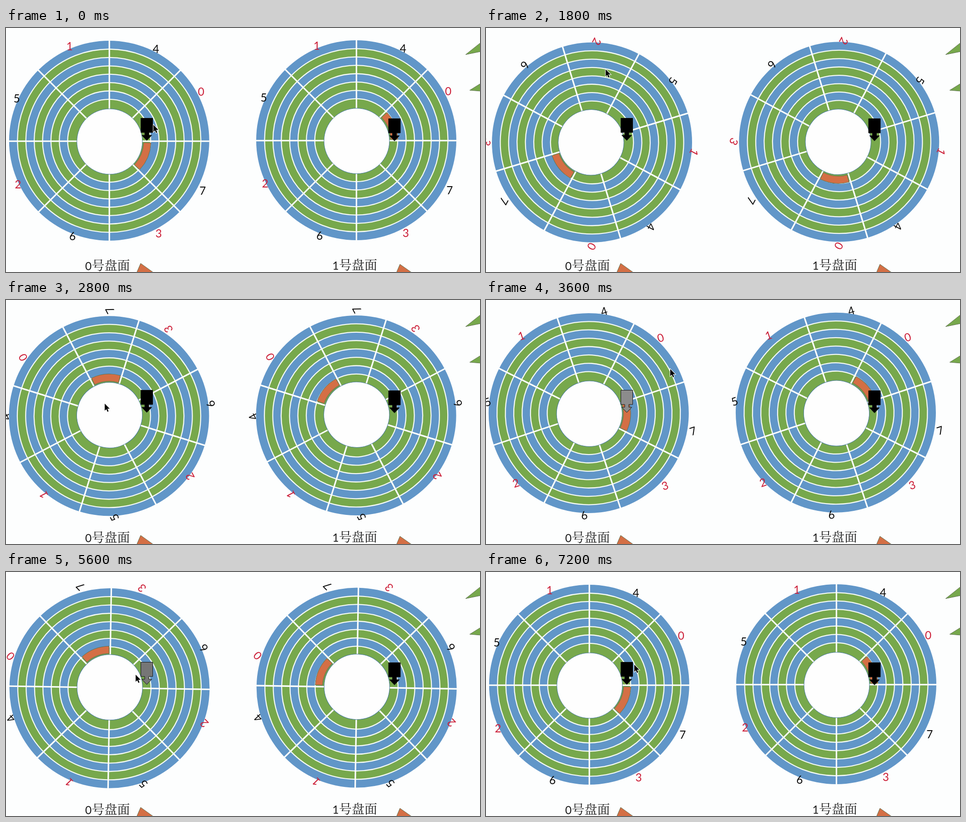
Recreate the animation shown at these times as an HTML page with a canvas. Size 1042 by 537 pixels, loop 7400 ms.

```html
<!DOCTYPE html>
<html lang="zh">
<head>
<meta charset="utf-8">
<style>
  html, body { margin: 0; width: 100%; height: 100%; overflow: hidden; background: #fdfefe; }
  canvas { display: block; }
</style>
</head>
<body>
<canvas id="stage" width="1042" height="537"></canvas>
<script>
const ctx = document.getElementById('stage').getContext('2d');
const LOOP = 7400, STEP = 200, TURN = 14.5; // TURN: steps per revolution
const BLUE = '#6196c8', GREEN = '#77a84c', ORANGE = '#d46f45', RED = '#cc2039';
const PAPER = '#fdfefe', EDGE = '#5d7050';
const DIGIT_FONT = '24.5px Lato, sans-serif';
const HAN_FONT = '300 28px "Noto Serif CJK SC", "Noto Sans CJK SC", "Noto Sans CJK", sans-serif';

// Stops of the mouse: step, x, y
const STOPS = [[0, 324, 213], [9, 263, 91], [14, 217, 228], [18, 405, 152],
  [23, 295, 172], [28, 285, 226], [36, 326, 204]];

const clamp = v => Math.min(1, Math.max(0, v));
const rad = deg => deg * Math.PI / 180;

// Two even revolutions with a short pause between them
const spin = s => 360 * (clamp((s - 4.24) / TURN) + clamp((s - 18.9) / TURN));

// The left head turns grey while reading, then slowly back to black
const grey = s => Math.round(146 * Math.min(clamp((s - 15.5) / 2.6), clamp((33.4 - s) / 6.7)));

function mouse(s) {
  const k = Math.max(1, STOPS.findIndex(p => p[0] >= s));
  const [s0, x0, y0] = STOPS[k - 1], [s1, x1, y1] = STOPS[k];
  const t = (s - s0) / (s1 - s0);
  return [x0 + (x1 - x0) * t, y0 + (y1 - y0) * t];
}

function paint(fill, stroke, width = 1) {
  ctx.fillStyle = fill;
  ctx.fill();
  if (!stroke) return;
  ctx.strokeStyle = stroke;
  ctx.lineWidth = width;
  ctx.stroke();
}

function poly(points, fill, stroke, width) {
  ctx.beginPath();
  points.forEach(([x, y]) => ctx.lineTo(x, y));
  ctx.closePath();
  paint(fill, stroke, width);
}

function circle(x, y, r, fill, stroke, width) {
  ctx.beginPath();
  ctx.arc(x, y, r, 0, Math.PI * 2);
  paint(fill, stroke, width);
}

function block(from) {
  const a = rad(from + 2.3), b = rad(from + 43.2);
  ctx.beginPath();
  ctx.arc(0.4, 1, 91.5, a, b);
  ctx.arc(0.4, 1, 75.5, b, a, true);
  ctx.closePath();
  paint(ORANGE, EDGE);
}

function spokes() {
  ctx.strokeStyle = '#fcfefc';
  ctx.lineWidth = 3.3;
  ctx.beginPath();
  for (let deg = 0; deg < 180; deg += 45) {
    const x = 222 * Math.cos(rad(deg)), y = 222 * Math.sin(rad(deg));
    ctx.moveTo(0.4 - x, 1 - y);
    ctx.lineTo(0.4 + x, 1 + y);
  }
  ctx.stroke();
}

// The same four angles serve the lower and the upper half
function digits() {
  ctx.font = DIGIT_FONT;
  ctx.textAlign = 'center';
  [28.6, 63.5, 112.9, 155.4].forEach((deg, i) => {
    for (const [side, row] of [[1, '7362'], [-1, '0415']]) {
      const x = 227 * Math.cos(rad(deg)), y = side * 227 * Math.sin(rad(deg));
      ctx.fillStyle = row[i] < 4 ? RED : '#0c0c0c';
      ctx.fillText(row[i], x + 4.5 + 0.015 * y, y + 10);
    }
  });
}

function disc(x, y, deg, blockFrom) {
  ctx.save();
  ctx.translate(x, y);
  ctx.rotate(rad(deg));
  ctx.translate(-2, -3.7); // the pivot lies a little off the disc centre
  circle(0, 0, 220, BLUE);
  for (let i = 1; i < 8; i++) {
    circle(0, 0, 220 - 18.4 * i, i % 2 ? GREEN : BLUE, '#f4faf4', 2.3);
  }
  spokes();
  circle(1, 1.8, 72, '#fefefe', '#44779f');
  block(blockFrom);
  digits();
  ctx.restore();
}

function head(x, y, fill) {
  const half = [[13, 0], [13, 31.5], [4.5, 31.5], [4.5, 37.5], [11, 37.5], [0, 49]];
  const mirror = half.slice(0, -1).reverse().map(([dx, dy]) => [-dx, dy]);
  poly([...half, ...mirror].map(([dx, dy]) => [x + dx, y + dy]), fill, '#111');
}

function label(n, x, baseline) {
  ctx.textAlign = 'left';
  ctx.fillStyle = '#1c1c1c';
  ctx.font = DIGIT_FONT;
  ctx.fillText(n, x, baseline);
  ctx.font = HAN_FONT;
  ctx.fillText('号盘面', x + 14.5, baseline);
}

function pointer([x, y]) {
  const shape = [[0, 0], [0, 15.5], [3.5, 12.3], [6, 18], [8.5, 17], [6, 11.3], [11, 11.3]]
    .map(([dx, dy]) => [x + dx, y + dy]);
  poly(shape, '#000', '#fff', 2);
  poly(shape, '#000');
}

function draw(ms) {
  const s = Math.floor((ms % LOOP) / STEP);
  const deg = spin(s), g = grey(s);
  ctx.fillStyle = PAPER;
  ctx.fillRect(0, 0, 1042, 537);

  disc(228.8, 251.8, deg, 0);
  disc(772, 250.6, deg, -45);

  poly([[1010.5, 58.5], [1050, 27], [1050, 50.5]], GREEN, EDGE);
  poly([[1019.5, 137], [1050, 118], [1050, 139.5]], GREEN, EDGE);
  poly([[296, 518], [284, 546], [335, 546]], ORANGE, EDGE);
  poly([[866, 520], [855, 546], [903, 546]], ORANGE, EDGE);
  label('0', 174, 532.5);
  label('1', 717.5, 531.5);

  head(309.5, 198.5, `rgb(${g},${g},${g})`);
  head(854, 199.5, '#000');
  pointer(mouse(s));
}

let start;
function tick(now) {
  start ??= now;
  draw(now - start);
  requestAnimationFrame(tick);
}
draw(0);
requestAnimationFrame(tick);
</script>
</body>
</html>
```
